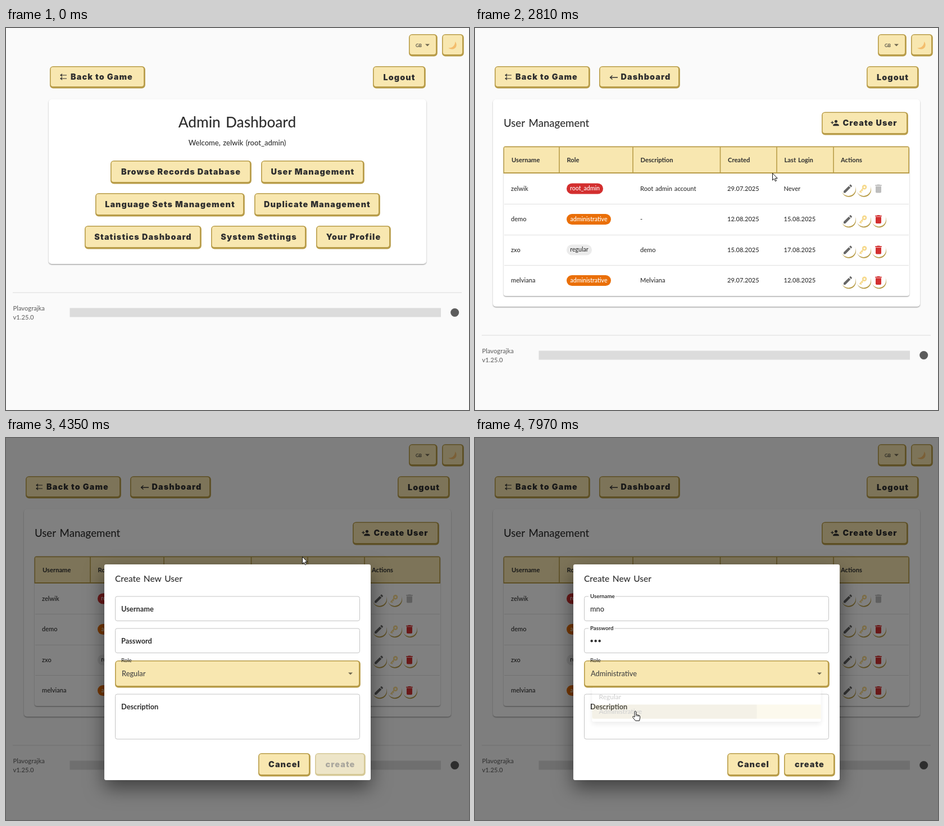
Animation of 824x680 px, one loop 8 s. Source, as an HTML page with a canvas:

```html
<!DOCTYPE html>
<html lang="en">
<head>
<meta charset="utf-8">
<title>User management</title>
<style>
  html, body { margin: 0; width: 824px; height: 680px; overflow: hidden; background: #fafafa; }
  canvas { display: block; }
</style>
</head>
<body>
<canvas id="stage" width="824" height="680"></canvas>
<script>
const LOOP = 8000;
const INK = '#2f2f2f', CREAM = '#f8e7b0', GOLD = '#b89c48', HOVER = '#efd898';
const stage = document.getElementById('stage').getContext('2d');
const spare = Object.assign(document.createElement('canvas'), { width: 824, height: 680 }).getContext('2d');
let c = stage, t = 0;

const ICON = {
  edit: 'M3 17.25V21h3.75L17.81 9.94l-3.75-3.75zM20.71 7.04c.39-.39.39-1.02 0-1.41l-2.34-2.34c-.39-.39-1.02-.39-1.41 0l-1.83 1.83 3.75 3.75z',
  bin: 'M6 19c0 1.1.9 2 2 2h8c1.1 0 2-.9 2-2V7H6zM19 4h-3.5l-1-1h-5l-1 1H5v2h14z',
  add: 'M15 12c2.2 0 4-1.8 4-4s-1.8-4-4-4-4 1.8-4 4 1.8 4 4 4zM6 10V7H4v3H1v2h3v3h2v-3h3v-2zM15 14c-2.7 0-8 1.3-8 4v2h16v-2c0-2.7-5.3-4-8-4z'
};
const CURSOR = {
  arrow: 'M.5 .5V13L3.4 10.3 5.4 14.8 7.4 13.9 5.5 9.5H9.2Z',
  hand: 'M0 1.6C0-.2 2.8-.2 2.8 1.6V6.5L8.2 7.8C9.8 8.2 10 10 9.6 12.4L8.6 17.3H1.6L-3 11.6C-4.3 9.6-2.4 8.4 0 11Z',
  beam: 'M-4-6.5h3l1 1 1-1h3M0-5.5V5.5M-4 6.5h3l1-1 1 1h3'
};
// Pointer hotspot: time, x, y
const TRACK = [
  [1640, 812, 548], [1910, 798, 330], [2090, 690, 280], [2360, 529, 258], [3450, 529, 258],
  [3720, 683, 165], [4260, 683, 165], [4530, 215, 303], [5350, 215, 303], [5620, 298, 374],
  [6620, 298, 374], [6890, 304, 414], [7250, 304, 414], [7340, 300, 440], [7610, 284, 486]
];

const clamp = v => Math.min(1, Math.max(0, v));
const lerp = (a, b, p) => a + (b - a) * p;
const within = (a, b) => t >= a && t < b;

// cubic-bezier(.4, 0, .2, 1)
function ease(x) {
  x = clamp(x);
  let lo = 0, hi = 1;
  for (let i = 0; i < 16; i++) {
    const u = (lo + hi) / 2, v = 1 - u;
    if (1.2 * v * v * u + 0.6 * v * u * u + u ** 3 < x) lo = u; else hi = u;
  }
  return 3 * (1 - lo) * lo * lo + lo ** 3;
}
const since = (start, ms) => ease((t - start) / ms);

function text(s, x, y, size = 12.8, color = INK, weight = 500, align = 'left') {
  c.font = `${weight} ${size}px Lato, sans-serif`;
  c.letterSpacing = '0px';
  c.wordSpacing = size * 0.1 + 'px';
  c.textAlign = align;
  c.fillStyle = color;
  c.fillText(s, x, y + size * 0.36);
}

function heavy(s, x, y, color = INK, align = 'center') {
  c.font = '900 14.4px Inter, sans-serif';
  c.letterSpacing = '1.1px';
  c.wordSpacing = '0px';
  c.textAlign = align;
  c.fillStyle = color;
  c.fillText(s, x, y + 5.2);
}

function box(x, y, w, h, r, fill) {
  c.beginPath();
  c.roundRect(x, y, w, h, r);
  c.fillStyle = fill;
  c.fill();
}

function disc(x, y, r, fill) {
  c.beginPath();
  c.arc(x, y, r, 0, 7);
  c.fillStyle = fill;
  c.fill();
}

function line(d, color, width) {
  c.strokeStyle = color;
  c.lineWidth = width;
  c.stroke(new Path2D(d));
}

function raised(x, y, w, h, r, fill, blur, drop, shade) {
  c.save();
  c.shadowColor = shade;
  c.shadowBlur = blur;
  c.shadowOffsetY = drop;
  box(x, y, w, h, r, fill);
  c.restore();
}
const card = (x, y, w, h) => raised(x, y, w, h, 5, '#fff', 2, 1.2, 'rgba(0,0,0,.38)');

function icon(d, x, y, scale, color) {
  c.save();
  c.translate(x - 12 * scale, y - 12 * scale);
  c.scale(scale, scale);
  c.fillStyle = color;
  c.fill(new Path2D(d));
  c.restore();
}

function plate(x, y, w, h, fill = CREAM, edge = GOLD) {
  box(x, y, w + .8, h + .5, 6, edge);
  box(x + 1.6, y + 1.6, w - 3.6, h - 4.6, 4, fill);
}

function button(s, x, y, w, h = 41, fill) {
  plate(x, y, w, h, fill);
  heavy(s, x + w / 2 + .5, y + 20);
}

function ripple(x, y, w, h, cx, cy, r, alpha) {
  c.save();
  c.beginPath();
  c.roundRect(x, y, w, h, 5);
  c.clip();
  disc(cx, cy, r, `rgba(50,50,50,${alpha})`);
  c.restore();
}

// Draws a group as one translucent picture
function layer(alpha, draw) {
  c = spare;
  c.clearRect(0, 0, 824, 680);
  c.save();
  draw();
  c.restore();
  c = stage;
  c.globalAlpha = alpha;
  c.drawImage(spare.canvas, 0, 0);
  c.globalAlpha = 1;
}

function chevron(x, y, up) {
  const d = up ? -2 : 2;
  c.beginPath();
  c.moveTo(x - 4, y - d);
  c.lineTo(x + 4, y - d);
  c.lineTo(x, y + d);
  c.fillStyle = '#6f674f';
  c.fill();
}

function backButton(x) {
  plate(x, 68, 169, 39);
  for (const y of [84, 90]) line(`M${x + 30} ${y}H${x + 19}m3-2.3l-3 2.3 3 2.3`, INK, 1.2);
  heavy('Back to Game', x + 37, 87, INK, 'left');
}

function topBar() {
  plate(717, 11, 50, 39);
  text('GB', 729, 31, 8);
  chevron(750, 30.5);
  plate(776, 11, 38, 39);
  c.fillStyle = '#f4bd6c';
  c.fill(new Path2D('M799.5 24C806 33 797 42 787 35.5 794 36 799 32 799.5 24Z'));
}

function footer(y) {
  c.fillStyle = '#dcdcdc';
  c.fillRect(12, y - .5, 799, 1);
  c.fillRect(113.5, y + 27.5, 660.5, 16);
  text('Plavograjka', 12.5, y + 27.5, 11.2, '#666');
  text('v1.25.0', 12.5, y + 43.5, 11.2, '#666');
  disc(798.7, y + 35.5, 7.5, '#5c5c5c');
}

function dashboard() {
  backButton(78);
  button('Logout', 653, 68, 93, 39);
  card(76, 127, 672, 293);
  text('Admin Dashboard', 411.5, 168, 26.2, INK, 500, 'center');
  text('Welcome, zelwik (root_admin)', 411.5, 204, 13, INK, 500, 'center');
  button('Browse Records Database', 186, 236, 250);
  button('User Management', 454, 236, 183, 41, t >= 2270 ? HOVER : CREAM);
  if (t >= 2540) ripple(456, 238, 179, 36, 530, 258, 40, .2);
  button('Language Sets Management', 159, 294, 265);
  button('Duplicate Management', 442, 294, 223);
  button('Statistics Dashboard', 140, 352, 207);
  button('System Settings', 365, 352, 169);
  button('Your Profile', 552, 352, 132);
  footer(471);
}

function chip(role, y) {
  const [w, fill, color] = {
    root_admin: [65, '#d32f2f', '#fff'],
    administrative: [79, '#ea6f08', '#fff'],
    regular: [45, '#ebebeb', INK]
  }[role];
  box(163, y - 9.5, w, 19, 9.5, fill);
  text(role, 163 + w / 2, y - .5, 10.6, color, 500, 'center');
}

function roundButton(x, y) {
  disc(x + .8, y + 2, 12.7, GOLD);
  disc(x, y, 12.9, '#fff');
}

function key(x, y) {
  line(`M${x + 1} ${y - 2}L${x - 6} ${y + 6}m1.5-1.5l2 2m.6-4.6l1.6 1.6`, '#f6d98c', 2);
  c.beginPath();
  c.arc(x + 2.6, y - 3.2, 2.9, 0, 7);
  c.lineWidth = 2.6;
  c.stroke();
}

const USERS = [
  ['zelwik', 'root_admin', 'Root admin account', '29.07.2025', 'Never'],
  ['demo', 'administrative', '-', '12.08.2025', '15.08.2025'],
  ['zxo', 'regular', 'demo', '15.08.2025', '17.08.2025'],
  ['melviana', 'administrative', 'Melviana', '29.07.2025', '12.08.2025']
];

function userTable() {
  raised(51, 211, 722, 266, 4, '#fff', 2, 1.2, 'rgba(0,0,0,.38)');
  box(50.5, 210.5, 722.5, 48.5, [4, 4, 0, 0], GOLD);
  box(52, 212.3, 719.3, 44.7, 0, CREAM);
  c.fillStyle = GOLD;
  for (const x of [150, 281, 436.5, 537, 638]) c.fillRect(x - .8, 212, 1.6, 46);
  ['Username', 'Role', 'Description', 'Created', 'Last Login', 'Actions'].forEach((s, i) =>
    text(s, [65, 163.5, 294.5, 450, 550.5, 651][i], 235, 11.2, INK, 700));
  USERS.forEach((user, i) => {
    const y = 286 + i * 54.5;
    user.forEach((s, j) => j === 1 ? chip(s, y) : text(s, [64, 0, 294, 449, 549.5][j], y, 11.1));
    if (i) {
      c.fillStyle = '#e0e0e0';
      c.fillRect(52, Math.round(y - 27.5), 720, 1);
      roundButton(718.5, y);
    }
    roundButton(664.5, y);
    roundButton(691.5, y);
    icon(ICON.edit, 663.5, y, .83, '#666');
    key(690.5, y + .5);
    icon(ICON.bin, 718, y, .83, i ? '#d32f2f' : '#bdbdbd');
  });
}

function userPage() {
  const ready = t >= 2810, bottom = ready ? 496 : 200;
  backButton(35);
  plate(221, 68, 143, 39);
  line('M254 88H240.5m4-3.5l-4 3.5 4 3.5', INK, 1.3);
  heavy('Dashboard', 259.5, 87, INK, 'left');
  button('Logout', 697, 68, 92, 39);
  card(32, 127, 760, bottom - 127);
  if (ready) {
    text('User Management', 51, 169.5, 18.6);
    plate(617, 149.5, 153, 40.5, within(3630, 3900) ? HOVER : CREAM);
    const fade = 1 - clamp((t - 4080) / 180);
    if (t > 3790 && fade) ripple(619, 151, 149, 36, 683, 169, (t - 3790) * .24, .22 * fade);
    icon(ICON.add, 640.5, 169, .66, INK);
    heavy('Create User', 654.5, 169, INK, 'left');
    userTable();
  }
  footer(bottom + 51);
}

function field(label, y, h, lift, focused) {
  c.beginPath();
  c.roundRect(194.5, y, 435, h, 3.5);
  c.strokeStyle = focused ? GOLD : '#c4c4c4';
  c.lineWidth = focused ? 1.8 : 1;
  c.stroke();
  const size = lerp(12.8, 9.7, lift), weight = lift < 1 ? 700 : 500;
  if (lift) {
    c.font = `${weight} 9.7px Lato, sans-serif`;
    c.letterSpacing = '0px';
    c.fillStyle = '#fff';
    c.fillRect(202, y - 2, c.measureText(label).width + 4, 4);
  }
  text(label, 205, lerp(y + 22, y, lift), size, INK, weight);
}

function caret(x, y) {
  c.fillStyle = INK;
  c.fillRect(x, y - 7.5, 1, 15);
}

function dialog() {
  const typing = within(4530, 5807), secret = within(5807, 6980);
  raised(175, 225, 474, 384, 3, '#fff', 34, 14, 'rgba(0,0,0,.5)');
  text('Create New User', 194, 250.5, 15.5);

  field('Username', 282, 43.5, since(4530, 200), typing);
  const name = 'mno'.slice(0, clamp((t - 5080) / 270) * 3);
  text(name, 205, 304);
  if (typing) caret(205 + Math.round(c.measureText(name).width), 304);

  field('Password', 339, 43.5, since(5807, 200), secret);
  const dots = t < 6350 ? 0 : t < 6440 ? 2 : 3;
  for (let i = 0; i < dots; i++) disc(207.7 + i * 7, 361.3, 2.2, INK);
  if (secret) caret(205 + dots * 7, 361);

  plate(194, 396, 436, 48);
  text('Role', 205, 395.5, 9.7);
  text(t < 7858 ? 'Regular' : 'Administrative', 206, 419.5, 12.8, '#444');
  chevron(613, 419.5, within(7025, 7858));
  field('Description', 456, 80, 0, false);

  button('Cancel', 449, 561, 92);
  if (dots) button('create', 550, 561, 90);
  else {
    plate(550, 561, 89, 40, '#ede5c8', '#d5c896');
    heavy('create', 595, 581, '#aaa79e');
  }
}

function menu() {
  const closing = t >= 7858, p = (t - (closing ? 7858 : 7025)) / 221;
  const alpha = closing ? 1 - ease(p) : ease(p);
  const scale = closing ? 1 - .25 * ease((p - .333) / .666) : .75 + .25 * ease(p / .666);
  layer(alpha, () => {
    c.translate(412, 444);
    c.scale(scale, scale * scale);
    c.translate(-412, -444);
    raised(194, 444, 436, 70, 3, '#fff', 10, 4, 'rgba(0,0,0,.35)');
    if (!closing) box(194, 450, 436, 29, 0, '#faf1cf');
    if (t >= 7430) box(194, 479, 436, 29, 0, '#f3e6ad');
    if (t > 7790) ripple(194, 479, 436, 29, 274, 493, (t - 7790) * 1.3, .2);
    text('Regular', 207, 464);
    text('Administrative', 207, 493);
  });
}

function pointer() {
  if (t < 1640 || within(2990, 3450) || within(4990, 5350) || within(6160, 6620)) return;
  const i = Math.max(0, TRACK.findLastIndex(k => k[0] <= t));
  const a = TRACK[i], b = TRACK[i + 1] || a;
  const p = clamp((t - a[0]) / (b[0] - a[0] || 1));
  const hand = within(2270, 2630) || within(3630, 3900) || t >= 7430;
  const kind = hand ? 'hand' : within(4440, 6740) ? 'beam' : 'arrow';
  c.save();
  c.translate(lerp(a[1], b[1], p), lerp(a[2], b[2], p));
  if (kind !== 'beam') {
    c.fillStyle = '#fff';
    c.fill(new Path2D(CURSOR[kind]));
  }
  line(CURSOR[kind], '#111', 1);
  if (hand) line('M2.8 6.5v3M5.3 7.2v2.8M7.6 7.8v2.6', '#111', .8);
  c.restore();
}

function render() {
  const now = performance.now() % LOOP;
  // The picture advances in 90 ms steps with a slight drift
  const drift = 20 + 10 * [3000, 4720, 6200].filter(m => now > m).length;
  t = Math.max(0, Math.floor((now - drift) / 90) * 90 + drift);

  c.fillStyle = '#fafafa';
  c.fillRect(0, 0, 824, 680);
  topBar();
  if (t < 2630) dashboard(); else userPage();
  const shown = since(3891, 225);
  if (shown) {
    c.fillStyle = `rgba(0,0,0,${shown / 2})`;
    c.fillRect(0, 0, 824, 680);
    layer(shown, dialog);
  }
  if (t >= 7025) menu();
  pointer();
  requestAnimationFrame(render);
}
render();
</script>
</body>
</html>
```
